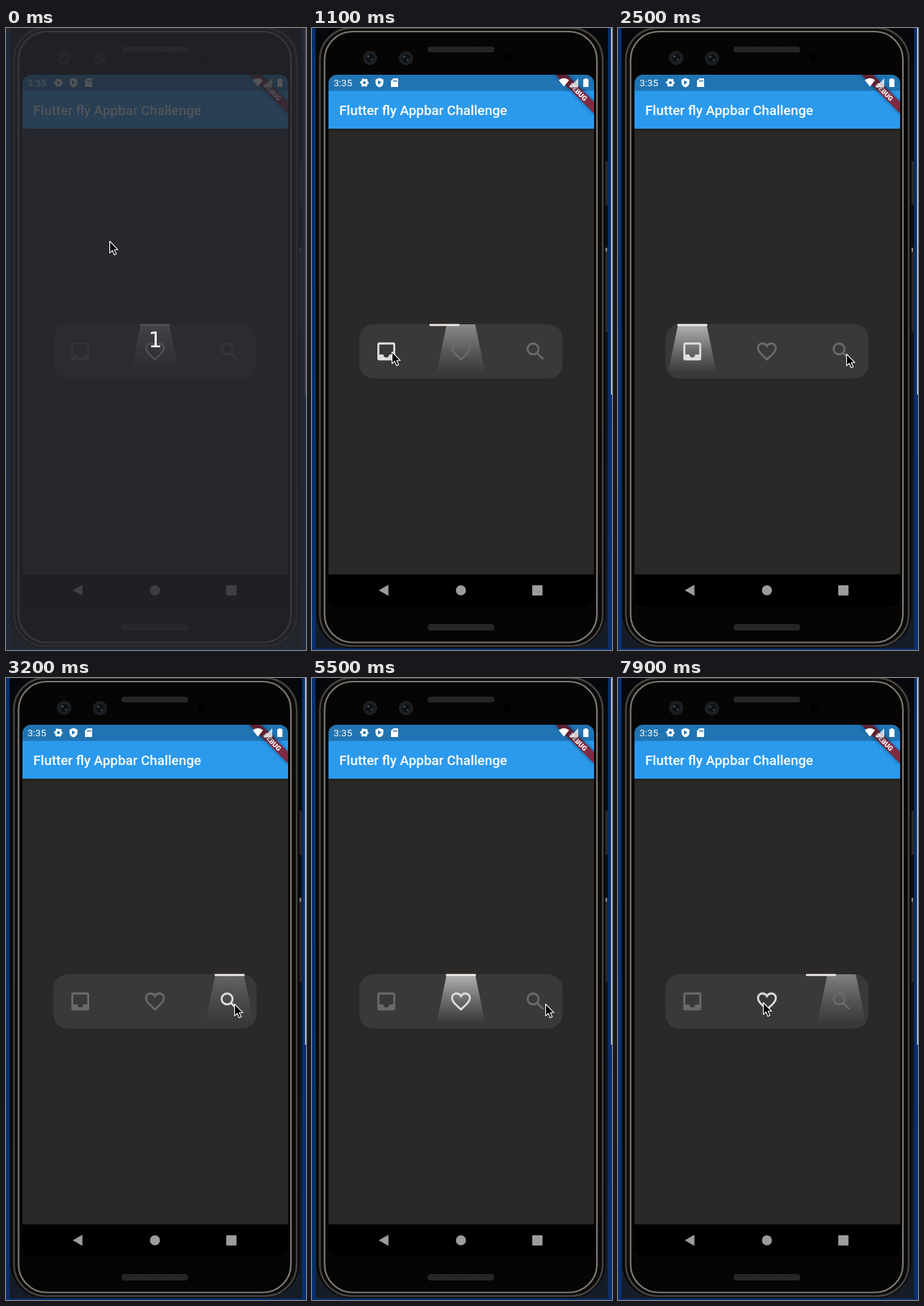
Write an HTML page that moves like this. It is 418x865 px and loops after 8000 ms.

```html
<!DOCTYPE html>
<html lang="en">
<head>
<meta charset="utf-8">
<title>Spotlight navigation bar</title>
<style>
  html, body { margin: 0; width: 100%; height: 100%; overflow: hidden; background: #08306f; }
  svg { display: block; width: 418px; height: 865px; }
  text { font-family: Roboto, "Noto Sans", sans-serif; fill: #fff; }
  .icon { fill: none; stroke: currentColor; stroke-width: 2; }
  .icon .solid { fill: currentColor; stroke: none; }
</style>
</head>
<body>
<svg viewBox="0 0 418 865" xmlns="http://www.w3.org/2000/svg">
  <defs>
    <clipPath id="screen"><rect x="23" y="65" width="370" height="740" rx="12"/></clipPath>
    <clipPath id="card"><rect x="66" y="412" width="283" height="75.5" rx="20"/></clipPath>
    <linearGradient id="beam" x1="0" y1="0" x2="0" y2="1">
      <stop offset="0" stop-color="#fff" stop-opacity=".62"/>
      <stop offset=".5" stop-color="#fff" stop-opacity=".24"/>
      <stop offset=".9" stop-color="#fff" stop-opacity="0"/>
    </linearGradient>
    <linearGradient id="shade" x1="0" y1="0" x2="0" y2="1">
      <stop offset="0" stop-color="#05070c"/>
      <stop offset="1" stop-color="#161d28"/>
    </linearGradient>
    <pattern id="mesh" width="3" height="3" patternUnits="userSpaceOnUse">
      <rect width="3" height="3" fill="#2b2928"/>
      <rect width="1.2" height="1.2" fill="#151414"/>
    </pattern>
    <filter id="soft" x="-20%" y="-80%" width="140%" height="260%"><feGaussianBlur stdDeviation="2.5"/></filter>
    <g id="lens">
      <circle r="10" fill="#1c1f22"/>
      <circle r="5.5" fill="#0d1013"/>
      <circle cx="-2.5" cy="-2" r="1.7" fill="#3f474d"/>
      <circle cx="2.5" cy="2.5" r="1.5" fill="#3f474d"/>
    </g>
  </defs>

  <!-- Backdrop and phone body -->
  <rect width="418" height="865" fill="#08306f"/>
  <rect x="416.8" width="1.2" height="510" fill="#e8e8e8"/>
  <rect x="5" width="407.500" height="863" fill="url(#shade)"/>
  <rect x="407" y="185" width="5" height="61" rx="1" fill="#2c2b2b"/>
  <rect x="407" y="305" width="5" height="118" rx="1" fill="#2c2b2b"/>
  <rect x="408" y="306" width="3" height="5" fill="#8d8b88"/>
  <rect x="6" y="-3" width="403" height="865" rx="48" fill="#0a0908"/>
  <rect x="11" y="0" width="394" height="859.500" rx="44" fill="none" stroke="#45423f" stroke-width="2.5"/>
  <rect x="17.500" y="5" width="379.500" height="849.500" rx="39" fill="#060504" stroke="#7d7975" stroke-width="2.2"/>
  <rect x="161" y="26" width="93" height="8" rx="4" fill="url(#mesh)"/>
  <rect x="161" y="829" width="93" height="9" rx="4.5" fill="url(#mesh)"/>
  <use href="#lens" x="81" y="41.5"/>
  <use href="#lens" x="131" y="42"/>
  <circle cx="272" cy="42" r="6" fill="#000"/>

  <g clip-path="url(#screen)">
    <rect x="23" y="65" width="370" height="740" fill="#2a2927"/>
    <rect x="23" y="130" width="370" height="11" fill="#000" opacity=".35" filter="url(#soft)"/>
    <rect x="23" y="65" width="370" height="75" fill="#2b9aed"/>
    <text x="38" y="120.700" font-size="18.83" font-weight="500">Flutter fly Appbar Challenge</text>
    <g transform="translate(393 65.500) rotate(45)">
      <rect x="-38" y="26.400" width="76" height="11.300" fill="#000" opacity=".5" filter="url(#soft)"/>
      <rect x="-38" y="26.400" width="76" height="11.300" fill="#7f2a43"/>
      <text x="1" y="35.500" font-size="9.6" font-weight="900" text-anchor="middle">DEBUG</text>
    </g>
    <rect x="23" y="65" width="370" height="22.500" fill="#000" opacity=".25"/>

    <!-- Status bar -->
    <text x="30" y="81" font-size="13.5">3:35</text>
    <g fill="none" stroke="#fff">
      <circle cx="73" cy="76" r="3.500" stroke-width="2.800"/>
      <circle cx="73" cy="76" r="5" stroke-width="2" stroke-dasharray="2.700 2.536" stroke-dashoffset="1.350"/>
    </g>
    <path fill="#fff" fill-rule="evenodd" d="M94 69.500l5.500 2.300v4q0 5-5.500 6.700-5.500-1.700-5.500-6.700v-4zM92 72.800v6l4.800-3z"/>
    <path fill="#fff" d="M113.500 70h6.500v12h-10v-8.500z"/>
    <path stroke="#2674b0" stroke-width="2.800" stroke-dasharray="1.200 .8" d="M113.300 73.700h5.200"/>
    <path fill="#fff" d="M343.800 72.500q7.200-5.500 14.400 0l-7.200 9z"/>
    <path fill="#fff" opacity=".75" d="M371 70v12h-12z"/>
    <path fill="#fff" d="M378 71.300h2v-1.300h3.200v1.300h2v10.700h-7.200z"/>

    <rect x="66" y="412" width="283" height="75.500" rx="20" fill="#3a3937"/>
    <g clip-path="url(#card)"><path id="light" fill="url(#beam)" d="M-19.800 412h39.600l15.700 75.500h-71z"/></g>
    <g class="icon">
      <rect x="4" y="4" width="16" height="16" rx="1"/>
      <path class="solid" d="M4 15h5a3 3 0 0 0 6 0h5v5h-16z"/>
    </g>
    <g class="icon">
      <path d="M12 20C6 14.600 3 11.900 3 8.500A4.500 4.500 0 0 1 7.500 4Q10.500 4 12 6.700 13.500 4 16.500 4A4.500 4.500 0 0 1 21 8.500C21 11.900 18 14.600 12 20z"/>
    </g>
    <g class="icon">
      <circle cx="9.500" cy="9.500" r="5.500"/>
      <path d="M13.500 13.500l6.200 6.200"/>
    </g>
    <rect id="line" x="-20.800" y="411.600" width="41.600" height="2.800" fill="#efecea"/>

    <rect x="23" y="759.800" width="370" height="46" fill="#000"/>
    <g fill="#9c9c9c">
      <path d="M93 782l13.500-7.800v15.600z"/>
      <circle cx="207.500" cy="782" r="7"/>
      <rect x="306.800" y="775" width="14.400" height="14.300" rx="1"/>
    </g>
  </g>

  <g id="veil">
    <rect width="418" height="865" fill="#27292f" fill-opacity=".8"/>
    <text x="208" y="443.500" font-size="30" text-anchor="middle" style="font-family:'DejaVu Sans',sans-serif">1</text>
  </g>
  <path id="cursor" fill="#000" stroke="#fff" stroke-width="1.100" stroke-linejoin="round" d="M.5.5v16.300l3.700-3.500 2.600 6.200 2.900-1.200-2.600-6h5z"/>
</svg>
<script>
  const LOOP = 8000, STEP = 100;
  const MOVE = 700, SLIDE = 380, FADE_OUT = 250, FADE_IN = 400, HALF = 400;
  const START = { move: -MOVE, tap: -2000, tab: 1, x: 144, y: 296 };
  // The pointer sets off at "move" and taps a tab at "tap"
  const VISITS = [
    START,
    { move: 0, tap: 1016, tab: 0, x: 111, y: 450 },
    { move: 1700, tap: 2660, tab: 2, x: 318, y: 453 },
    { move: 3400, tap: 4430, tab: 1, x: 198, y: 453 },
    { move: 4800, tap: 6340, tab: 2, x: 325, y: 453 },
    { move: 6600, tap: 7795, tab: 1, x: 202, y: 451 }
  ];

  const clamp = v => Math.min(1, Math.max(0, v));
  const mix = (a, b, p) => a + (b - a) * p;
  const easeOut = p => 1 - (1 - p) ** 3;
  const center = tab => 207.5 + (tab - 1) * 104;
  const place = (el, x, y = 0) => el.setAttribute("transform", `translate(${x} ${y})`);

  const [light, line, veil, cursor] = ["light", "line", "veil", "cursor"].map(id => document.getElementById(id));
  const icons = [...document.querySelectorAll(".icon")];
  icons.forEach((icon, i) => icon.setAttribute("transform", `translate(${center(i) - 16.6} 433.2) scale(1.385)`));

  // Latest visit whose given time has passed, and the one before it
  function latest(key, t) {
    const n = VISITS.filter(v => v[key] <= t).length - 1;
    return [VISITS[Math.max(0, n - 1)], VISITS[n]];
  }

  function drawPointer(t) {
    const [a, b] = latest("move", t);
    const p = easeOut(clamp((t - b.move) / MOVE));
    place(cursor, mix(a.x, b.x, p), mix(a.y, b.y, p));
  }

  function drawBar(t) {
    const [from, to] = latest("tap", t);
    const age = t - to.tap;
    const leaving = age < HALF;
    place(line, mix(center(from.tab), center(to.tab), clamp(age / SLIDE)));
    place(light, center(leaving ? from.tab : to.tab));
    light.setAttribute("opacity", clamp(leaving ? 1 - age / FADE_OUT : (age - HALF) / FADE_IN));
    icons.forEach((icon, i) => icon.setAttribute("color", i === to.tab ? "#dedddd" : "#6b6a69"));
  }

  function draw(t) {
    drawPointer(t);
    drawBar(t);
    veil.setAttribute("opacity", clamp(1 - t / 400));
  }

  const origin = performance.now();
  function tick() {
    const t = (performance.now() - origin) % LOOP;
    draw(Math.floor(t / STEP) * STEP);
    requestAnimationFrame(tick);
  }
  tick();
</script>
</body>
</html>
```
